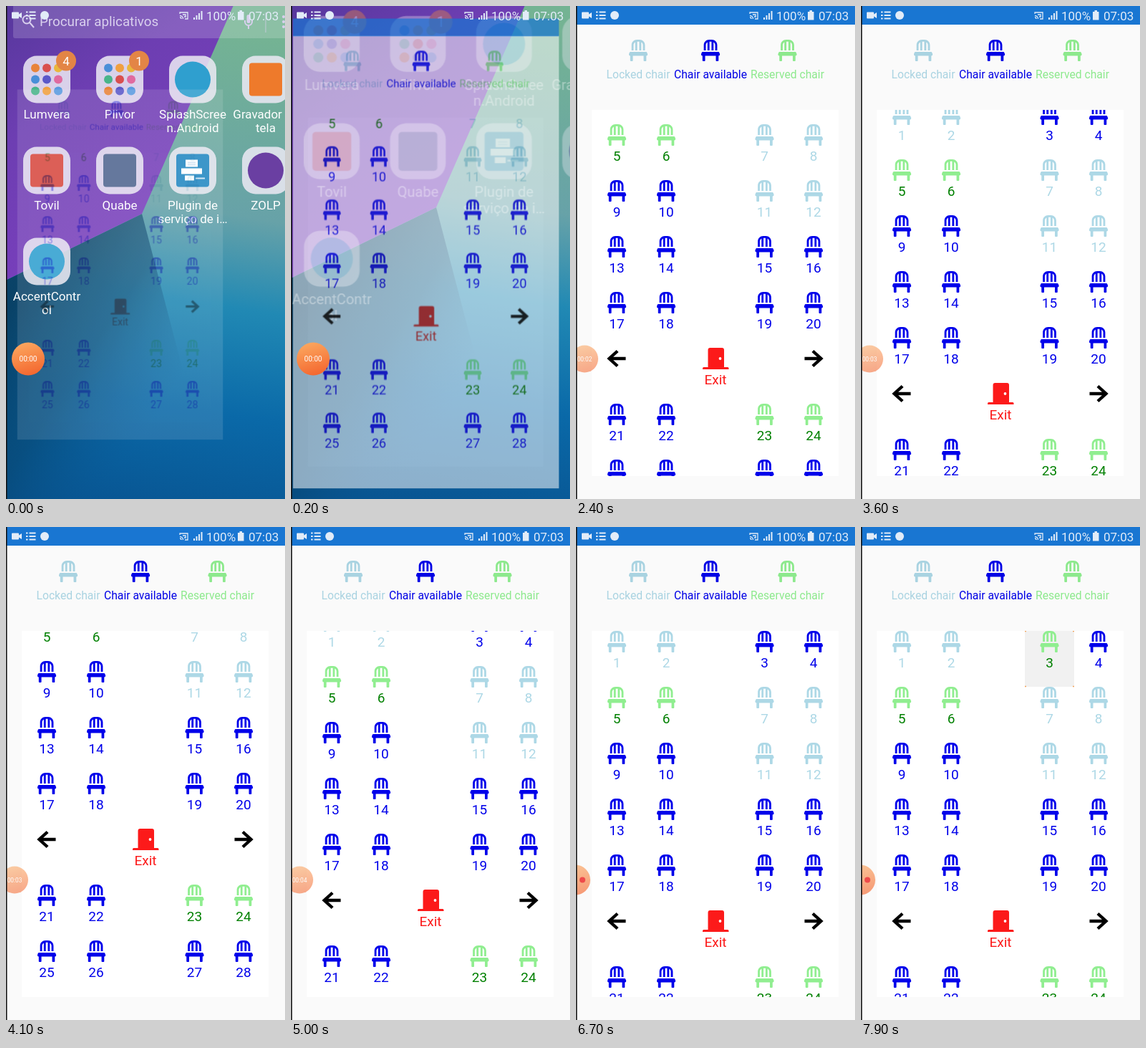
These frames come from a looping animation (390x688 px, 8000 ms). An HTML page:

```html
<!DOCTYPE html>
<html lang="pt">
<head>
<meta charset="utf-8">
<title>Chair picker</title>
<style>
html, body { margin: 0; width: 100%; height: 100%; overflow: hidden; background: #fafafa; }
svg { display: block; width: 390px; height: 688px; font-family: Roboto, sans-serif; }
text { text-anchor: middle; }
#home text { fill: #fff; font-size: 17px; }
#body { mix-blend-mode: multiply; }
#status { fill: #e2ecf8; }
#status text { text-anchor: start; font-size: 17px; }
</style>
</head>
<body>
<svg viewBox="0 0 390 688">
  <defs>
    <linearGradient id="gSky" x1=".3" y1="0" x2=".2" y2="1">
      <stop offset="0" stop-color="#74b393"/><stop offset=".36" stop-color="#67a2a8"/>
      <stop offset=".54" stop-color="#2189b4"/><stop offset=".75" stop-color="#0a69a8"/>
      <stop offset="1" stop-color="#08528f"/>
    </linearGradient>
    <linearGradient id="gShade" gradientUnits="userSpaceOnUse" x1="60" y1="340" x2="270" y2="480">
      <stop offset="0" stop-color="#06375a" stop-opacity=".85"/>
      <stop offset=".5" stop-color="#07456f" stop-opacity=".6"/>
      <stop offset="1" stop-color="#0a5a94" stop-opacity="0"/>
    </linearGradient>
    <linearGradient id="gPurple" x1="0" y1="0" x2=".6" y2="1">
      <stop offset="0" stop-color="#533699"/><stop offset=".4" stop-color="#6d3eb2"/>
      <stop offset="1" stop-color="#7d3fc0"/>
    </linearGradient>
    <linearGradient id="gBall" x1=".3" y1="0" x2=".6" y2="1">
      <stop offset="0" stop-color="#fba75f"/><stop offset="1" stop-color="#f4672f"/>
    </linearGradient>
    <clipPath id="view"><rect x="22" y="145" width="345" height="511"/></clipPath>
    <path id="chair" transform="translate(-13.1 0) scale(.0586)" d="M112 128c0-29.5 16.2-55 40-68.9V256h48V48h48v208h48V59.1c23.8 13.9 40 39.4 40 68.9v128h48V128C384 57.3 326.7 0 256 0h-64C121.3 0 64 57.3 64 128v128h48zm334 214l-11-32c-4-13-16-22-30-22H43c-14 0-26 9-31 22l-10 32C-5 363 10 384 32 384v112q0 16 16 16h32q16 0 16-16V384h256v112q0 16 16 16h32q16 0 16-16V384c22 0 37-21 30-42z"/>
    <path id="arrow" d="M1 -10.5L-10.5 0L1 10.5M-10 0H12.5" fill="none" stroke="#000" stroke-width="4.4"/>
  </defs>

  <g id="wall">
    <rect x="-30" width="450" height="710" fill="url(#gSky)"/>
    <path d="M-30 397L190 290L300 710H-30Z" fill="url(#gShade)"/>
    <path d="M-30 -10H322L190 290L-30 397Z" fill="url(#gPurple)"/>
  </g>

  <g id="home">
    <rect x="10" y="-4" width="384" height="49" rx="3" fill="#fff" opacity=".17"/>
    <g fill="none" stroke="#d9d0ee" stroke-width="2">
      <circle cx="29" cy="19" r="5.5"/><path d="M33 23L39 30"/>
      <path d="M334 20v2a5 5 0 0 0 10 0v-2M339 27v5"/><path d="M363 9v28" stroke-width="1" opacity=".7"/>
    </g>
    <rect x="336.500" y="12" width="5" height="12" rx="2.500" fill="#d9d0ee"/>
    <g fill="#d9d0ee"><circle cx="388" cy="15" r="2"/><circle cx="388" cy="22" r="2"/><circle cx="388" cy="29" r="2"/></g>
    <text x="47" y="28" style="font-size:18.800px;text-anchor:start;fill:#d9d0ee">Procurar aplicativos</text>
  </g>

  <g id="win">
    <g id="paper">
      <rect y="25" width="390" height="663" fill="#fafafa"/>
      <rect x="22" y="145" width="345" height="511" fill="#fff"/>
    </g>
    <rect id="strip" width="390" height="26" fill="#1976d2"/>
  </g>

  <g id="body">
    <g id="legend" font-size="15.700"></g>
    <g clip-path="url(#view)">
      <g id="rows" font-size="19">
        <g id="cell">
          <rect x="229" y="145" width="69" height="78" fill="#f1f1f1"/>
          <path d="M229 145.500h2M296 145.500h2M229 222.500h2M296 222.500h2" stroke="#f3a45c" stroke-width="1.500"/>
        </g>
        <use href="#arrow" x="57" y="550"/>
        <use href="#arrow" transform="translate(332 550) scale(-1 1)"/>
        <g fill="#fc1a1a">
          <path d="M184.500 562V538q0-3 3-3h16.500q3 0 3 3V562h5q1.500 0 1.500 1.500V565h-36.500v-1.500q0-1.500 1.500-1.500z"/>
          <circle cx="201.500" cy="550" r="1.900" fill="#fff"/>
          <text x="195" y="586">Exit</text>
        </g>
      </g>
      <path id="glow" d="M22 145H367V149Q195 185 22 149Z" fill="#1976d2"/>
    </g>
  </g>

  <g id="status">
    <path d="M8 9.500q0-1 1-1h8q1 0 1 1v2l4-2.500v8l-4-2.500v2q0 1-1 1h-8q-1 0-1-1z"/>
    <path d="M28 8.500h2.500M32.500 8.500h9M28 13h2.500M32.500 13h9M28 17.500h2.500M32.500 17.500h9" stroke="#e2ecf8" stroke-width="2"/>
    <circle cx="54" cy="13" r="6"/>
    <path d="M243 11V9h11v9h-4M243 13.500a4.500 4.500 0 0 1 4.500 4.500M243 16a2 2 0 0 1 2 2M247 12h4v3h-2" fill="none" stroke="#e2ecf8" stroke-width="1.300"/>
    <path d="M262 16h2v3h-2zM265.500 13h2v6h-2zM269 10h2v9h-2zM272.500 7h2v12h-2z"/>
    <text x="280" y="19.500">100%</text>
    <path d="M324 8h2.500v-2h3.500v2h2.500v11.500h-8.500z"/>
    <text x="339" y="19.500">07:03</text>
  </g>

  <g id="ball">
    <circle r="23" fill="url(#gBall)"/>
    <text id="clock" y="3.700" font-size="10" fill="#fff"></text>
  </g>
  <circle id="dot" cx="9" cy="492.500" r="4" fill="#ee4a4a"/>
  <rect width="1.500" height="688" fill="#111"/>
</svg>

<script>
const $ = id => document.getElementById(id);
const LOOP = 8000, STEP = 100;
const COLS = [57, 126, 263.5, 332];
const LOOK = {
  locked: ['#add8e6', '#add8e6'],
  free: ['#0000ea', '#0000ea'],
  reserved: ['#90ee90', '#008000'],
  pale: ['#90ee90', '#90ee90']
};

function add(parent, tag, attrs, text) {
  const node = document.createElementNS('http://www.w3.org/2000/svg', tag);
  for (const key in attrs) node.setAttribute(key, attrs[key]);
  if (text !== undefined) node.textContent = text;
  return parent.appendChild(node);
}

function addChair(parent, x, y, labelY, label, look) {
  const icon = add(parent, 'use', { href: '#chair', x, y });
  const text = add(parent, 'text', { x, y: labelY }, label);
  const paint = name => {
    icon.setAttribute('fill', LOOK[name][0]);
    text.setAttribute('fill', LOOK[name][1]);
  };
  paint(look);
  return paint;
}

// Legend and seats
addChair($('legend'), 87, 47, 101, 'Locked chair', 'locked');
addChair($('legend'), 188, 47, 101, 'Chair available', 'free');
addChair($('legend'), 295.5, 47, 101, 'Reserved chair', 'pale');

const locked = [1, 2, 7, 8, 11, 12], reserved = [5, 6, 23, 24];
const seats = {};
for (let n = 1; n <= 28; n++) {
  const row = Math.floor((n - 1) / 4);
  const y = 145 + 78 * (row < 5 ? row : row + 1);
  const look = locked.includes(n) ? 'locked' : reserved.includes(n) ? 'reserved' : 'free';
  seats[n] = addChair($('rows'), COLS[(n - 1) % 4], y, y + 51, n, look);
}

// Launcher
const APPS = [
  ['folder', '4', 'Lumvera'], ['folder', '1', 'Plivor'],
  ['circle', '#2f9fcf', 'SplashScree', 'n.Android'], ['square', '#ee7a2b', 'Gravador de', 'tela'],
  ['square', '#d8493f', 'Tovil'], ['square', '#50658f', 'Quabe'],
  ['printer', '#2288c2', 'Plugin de', 'serviço de i…'], ['circle', '#6a3fa2', 'ZOLP'],
  ['circle', '#2f9fcf', 'AccentContr', 'ol']
];
const MINI = ['#e8843a', '#d94f4f', '#e9b63c', '#4a8fd8', '#5b58c9', '#e06aa0', '#49b58a', '#f0a040', '#5a9ae0'];

APPS.forEach(([kind, tint, ...lines], i) => {
  const x = 57 + 102 * (i % 4), y = 102.5 + 127 * Math.floor(i / 4);
  const g = add($('home'), 'g', { transform: `translate(${x} ${y})` });
  add(g, 'rect', { x: -33, y: -33, width: 66, height: 66, rx: 19, fill: '#ece9f4', opacity: .86 });
  if (kind === 'folder') {
    MINI.forEach((fill, k) => add(g, 'circle', {
      cx: (k % 3 - 1) * 16, cy: (Math.floor(k / 3) - 1) * 16, r: 6, fill: tint === '4' ? fill : MINI[(k * 4 + 3) % 9]
    }));
    add(g, 'circle', { cx: 27, cy: -26, r: 14, fill: '#e38546' });
    add(g, 'text', { x: 27, y: -20 }, tint);
  } else if (kind === 'circle') {
    add(g, 'circle', { r: 25, fill: tint });
  } else {
    add(g, 'rect', { x: -23, y: -23, width: 46, height: 46, rx: 4, fill: tint });
  }
  if (kind === 'printer') {
    add(g, 'path', { d: 'M-10 -15h17v10h-17zM-16 -3h29v8h-29zM-11 7h13v7h-13z', fill: '#fff' });
    add(g, 'path', { d: 'M4 11h13M-7 -11h11M-7 -8h11', stroke: '#cfe4f4', 'stroke-width': 2 });
  }
  lines.forEach((line, k) => add(g, 'text', { y: 54 + 19 * k }, line));
});

// Motion: [time, value] pairs, linear in between
const TRACKS = {
  winScale: [[0, .737], [100, .87], [200, .953], [300, .988], [400, 1]],
  paper: [[0, .12], [200, .55], [300, .85], [400, 1]],
  strip: [[0, 0], [200, .7], [400, 1]],
  body: [[0, .4], [200, .85], [400, 1]],
  homeScale: [[0, 1], [200, 1.18], [400, 1.27]],
  home: [[0, 1], [200, .42], [400, 0]],
  wall: [[0, 0], [200, 1]],
  glow: [[2800, 0], [3000, .1], [3400, 0], [5200, 0], [5400, .12], [5500, .12], [6000, 0]],
  ballX: [[1600, 31], [2200, 12], [5800, 12], [6100, -1]],
  ballR: [[1600, 23], [2200, 19], [5800, 19], [6100, 21]],
  ball: [[400, 1], [800, .9], [1600, .9], [2200, .56], [5800, .56], [6100, .65]],
  dot: [[5800, 0], [6100, 1]]
};
const SCROLLS = [[1900, 2910, 114, 0], [3500, 4050, 0, 114], [4500, 5250, 114, 0]];

function at(name, t) {
  const track = TRACKS[name];
  const i = track.findIndex(p => p[0] > t);
  if (i === 0) return track[0][1];
  if (i < 0) return track[track.length - 1][1];
  const [t0, a] = track[i - 1], [t1, b] = track[i];
  return a + (b - a) * (t - t0) / (t1 - t0);
}

function scrollAt(t) {
  let s = 114;
  for (const [from, to, a, b] of SCROLLS) {
    if (t < from) break;
    const k = Math.min(1, (t - from) / (to - from));
    s = a + (b - a) * (1 - Math.cos(Math.PI * k)) / 2;
  }
  return Math.round(s);
}

const move = (id, value) => $(id).setAttribute('transform', value);
const zoom = (id, x, y, s) => move(id, `translate(${x} ${y}) scale(${s}) translate(${-x} ${-y})`);

function render(t) {
  for (const id of ['paper', 'strip', 'body', 'home', 'glow', 'ball', 'dot']) {
    $(id).setAttribute('opacity', at(id, t));
  }
  for (const id of ['win', 'body']) zoom(id, 60, 373, at('winScale', t));
  zoom('home', 57, 378, at('homeScale', t));
  const drift = at('wall', t);
  move('wall', `translate(${13 * drift} ${-9 * drift})`);
  move('rows', `translate(0 ${-scrollAt(t)})`);
  move('ball', `translate(${at('ballX', t)} 492.5) scale(${at('ballR', t) / 23})`);
  const sec = Math.max(0, Math.floor((t - 200) / 1000));
  $('clock').textContent = t < 5900 ? '00:0' + sec : '';
  $('cell').setAttribute('opacity', t >= 7500 ? 1 : 0);
  seats[3](t >= 7600 ? 'reserved' : 'free');
}

function tick() {
  render(Math.floor(performance.now() % LOOP / STEP) * STEP);
  requestAnimationFrame(tick);
}
tick();
</script>
</body>
</html>
```
